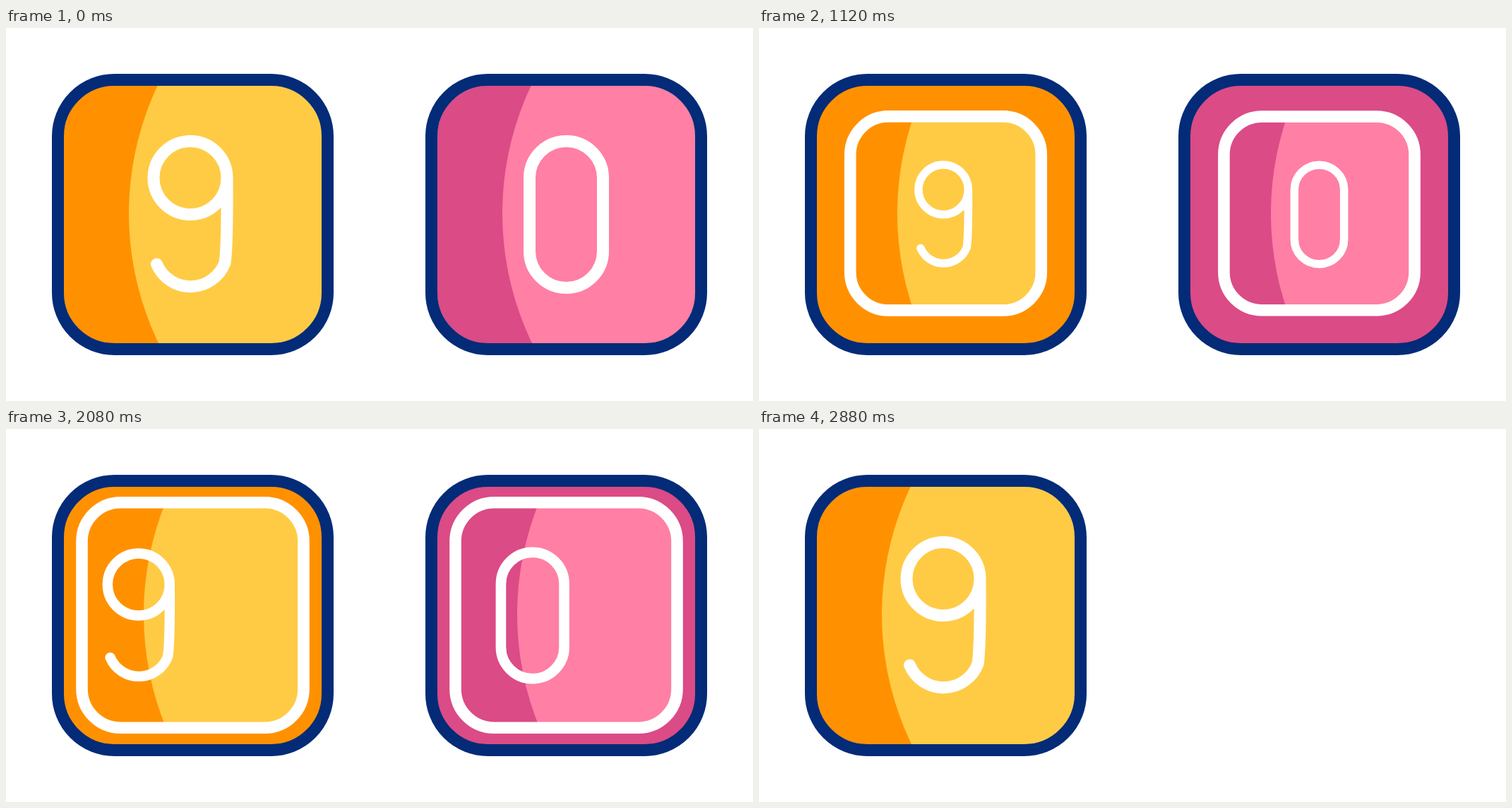
An HTML page that plays this animation: 1058x529 px, repeating every 3000 ms.

```html
<!DOCTYPE html>
<html lang="en">
<head>
<meta charset="utf-8">
<title>Number tiles</title>
<style>
  html, body { margin: 0; width: 100%; height: 100%; overflow: hidden; background: #fff; }
  svg { display: block; width: 100%; height: 100%; }
</style>
</head>
<body>
<svg id="stage" viewBox="0 0 1058 529"></svg>
<script>
const LOOP = 3000, STEP = 40;
const MID = 264.5, SHADE_RADIUS = 424, SLIDE = 522;

const NINE = 'M313 212.5A52 52 0 1 0 209 212.5A52 52 0 1 0 313 212.5' +
  'C313.5 275 313 312 310 333A52 52 0 0 1 213.5 335';
const ZERO = 'M212.5 212.5a52 52 0 0 1 104 0v104a52 52 0 0 1 -104 0z';

// lead: ms this tile runs ahead; end: time at which it leaves the stage
const tiles = [
  { x: 0, lead: 0, end: LOOP, dark: '#ff9100', light: '#ffcb45',
    glyph: NINE, glyphX: 261.3, glyphSmall: 0.846 },
  { x: 529, lead: 40, end: 2880, dark: '#db4b86', light: '#ff7fa5',
    glyph: ZERO, glyphX: MID, glyphSmall: 0.862 }
];

const lerp = (a, b, k) => a + (b - a) * k;
const progress = (t, start, end) => Math.min(1, Math.max(0, (t - start) / (end - start)));

// Timing curve cubic-bezier(x1, 0, x2, 1), solved by bisection.
function bezierEase(x1, x2) {
  return x => {
    let low = 0, high = 1;
    for (let i = 0; i < 24; i++) {
      const s = (low + high) / 2, r = 1 - s;
      if (3 * x1 * s * r * r + 3 * x2 * s * s * r + s * s * s < x) low = s; else high = s;
    }
    return low * low * (3 - 2 * low);
  };
}
const sharp = bezierEase(0.88, 0.1);
const medium = bezierEase(0.67, 0.33);
const soft = bezierEase(1 / 3, 2 / 3);

// Shrink to low, settle at mid, then grow back to full.
function squeeze(t, full, low, mid) {
  const dip = lerp(full, low, sharp(progress(t, 400, 1200)));
  const settled = lerp(dip, mid, soft(progress(t, 1200, 1600)));
  return lerp(settled, full, medium(progress(t, 2174, 2814)));
}

// Leave on the right and come back in from the left.
function slide(t) {
  const shift = SLIDE * sharp(progress(t, 1600, 2400));
  return shift < SLIDE / 2 ? shift : shift - SLIDE;
}

function setAttributes(node, values) {
  for (const name in values) node.setAttribute(name, values[name]);
}

function add(parent, tag, values) {
  const node = document.createElementNS('http://www.w3.org/2000/svg', tag);
  setAttributes(node, values);
  return parent.appendChild(node);
}

function buildTile(tile, index) {
  const root = add(stage, 'g', { transform: `translate(${tile.x} 0)` });
  const box = { x: 73.5, y: 73.5, width: 382, height: 382, rx: 80 };
  const clip = add(root, 'clipPath', { id: 'face' + index });
  const face = add(clip, 'rect', box);
  add(root, 'rect', { ...box, fill: tile.dark });
  const panel = add(root, 'g', { 'clip-path': `url(#face${index})` });
  const shade = add(panel, 'circle', { cy: 263, r: SHADE_RADIUS, fill: tile.light });
  const digit = add(panel, 'path', {
    d: tile.glyph, fill: 'none', stroke: '#fff', 'stroke-width': 17,
    'stroke-linecap': 'round', 'stroke-linejoin': 'round'
  });
  const ring = add(root, 'rect', { fill: 'none', stroke: '#fff', 'stroke-width': 16.6 });
  add(root, 'rect', { ...box, fill: 'none', stroke: '#032b77', 'stroke-width': 17 });
  return { ...tile, root, face, shade, ring, digit };
}

function drawTile(tile, time) {
  tile.root.style.display = time < tile.end ? '' : 'none';
  const t = time + tile.lead;
  const width = squeeze(t, 382, 270, 314);
  const height = squeeze(t, 382, 274.5, 319.5);
  const centreY = squeeze(t, MID, 262.9, 264);
  const outline = {
    x: MID - width / 2, y: centreY - height / 2, width, height,
    rx: squeeze(t, 80, 54, 55)
  };
  setAttributes(tile.face, outline);
  setAttributes(tile.ring, outline);
  setAttributes(tile.shade, { cx: squeeze(t, 174, 196, 195) + SHADE_RADIUS });
  const scale = squeeze(t, 1, 0.676, tile.glyphSmall);
  tile.digit.setAttribute('transform',
    `translate(${tile.glyphX + slide(t)} ${MID}) scale(${scale}) translate(${-tile.glyphX} ${-MID})`);
}

const stage = document.getElementById('stage');
const parts = tiles.map(buildTile);
const startTime = performance.now();

function draw() {
  const elapsed = Math.max(0, performance.now() - startTime) % LOOP;
  const time = Math.floor(elapsed / STEP) * STEP;
  parts.forEach(tile => drawTile(tile, time));
  requestAnimationFrame(draw);
}
draw();
</script>
</body>
</html>
```
